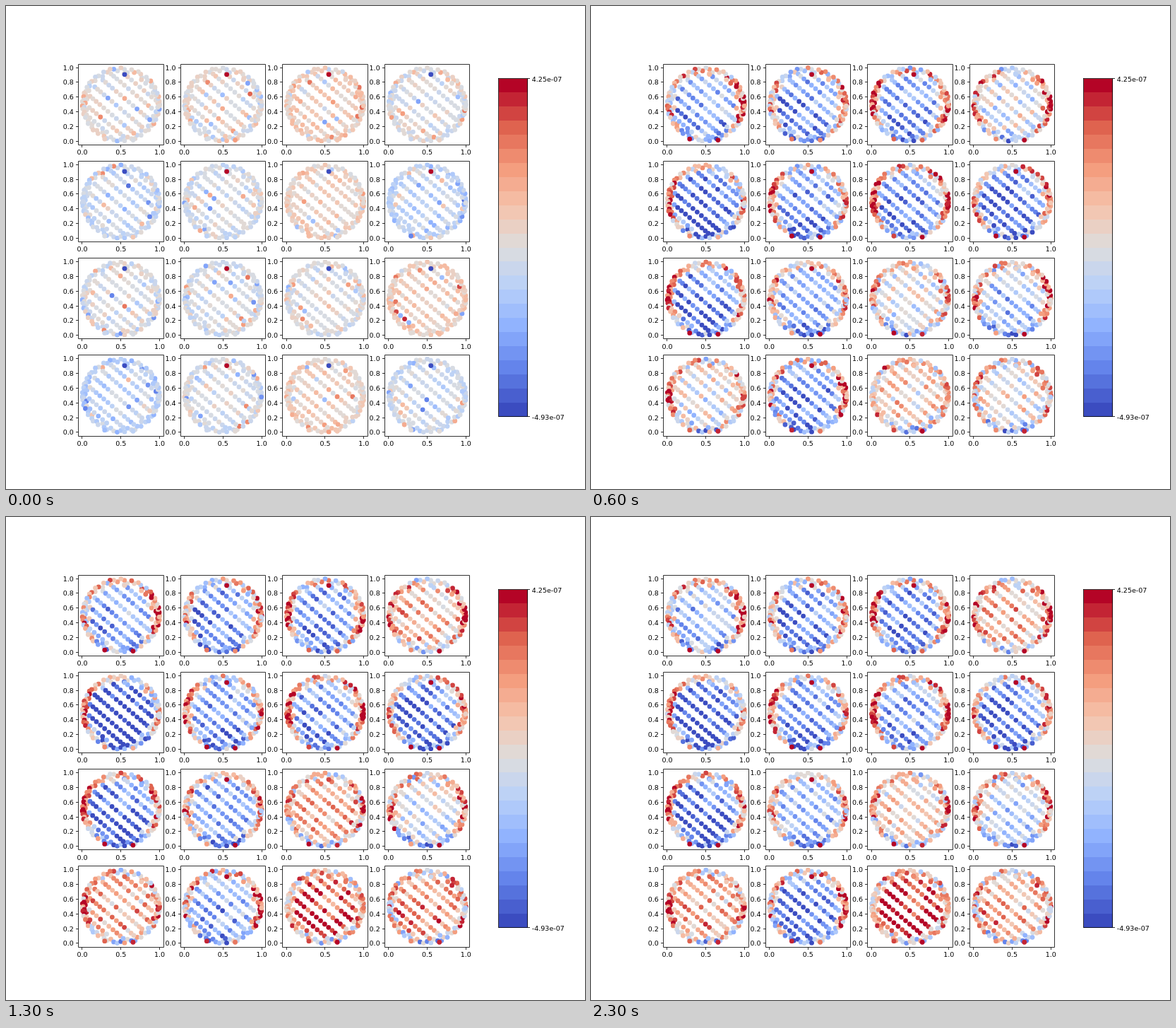
An HTML page for the animation above (2400 ms loop, 820x683 px).

```html
<!DOCTYPE html>
<html lang="en">
<head>
<meta charset="utf-8">
<title>Scatter grid</title>
<style>
  html, body { margin: 0; width: 100%; height: 100%; overflow: hidden; background: #fff; }
  svg { display: block; width: 820px; height: 683px; }
  text { font: 9.5px "DejaVu Sans", sans-serif; }
  .line { fill: none; stroke: #000; stroke-width: .8; }
</style>
</head>
<body>
<svg id="stage" viewBox="0 0 820 683"></svg>
<script>
const stage = document.getElementById('stage');
const FRAME = 100, FRAMES = 24;
const W = 120.5, H = 114.35, SX = W / 1.1, SY = H / 1.1;
const { sin, cos, floor, hypot, PI } = Math;

function add(tag, attrs, text) {
  const el = document.createElementNS('http://www.w3.org/2000/svg', tag);
  for (const key in attrs) el.setAttribute(key, attrs[key]);
  if (text) el.textContent = text;
  return stage.appendChild(el);
}
const snap = v => floor(v) + .5;
const mix = (a, b, t) => a + (b - a) * t;
const clamp = (v, lo = 0, hi = 1) => Math.min(hi, Math.max(lo, v));
const noise = (a, b, c) => {
  const s = sin(a * 12.9898 + b * 78.233 + c * 37.719) * 43758.5453;
  return 2 * (s - floor(s)) - 1;
};

// Diverging blue-grey-red map in equal flat bands
const BANDS = 24;
const ANCHORS = ['3b4cc0', '6282ea', '8db0fe', 'b8d0f9', 'dddddd',
  'f5c4ad', 'f49a7b', 'de604d', 'b40426']
  .map(hex => [0, 2, 4].map(i => parseInt(hex.slice(i, i + 2), 16)));
const bands = Array.from({ length: BANDS }, (_, n) => {
  const s = n / (BANDS - 1) * 8, i = Math.min(7, floor(s));
  return `rgb(${ANCHORS[i].map((c, k) => Math.round(mix(c, ANCHORS[i + 1][k], s - i)))})`;
});
const colorOf = v => bands[Math.min(BANDS - 1, floor(clamp((v + 1) / 2) * BANDS))];

// Dense ring of dots, crowded at the left and right
const dots = [];
for (let k = 0; k < 92; k++) {
  const a = 2 * PI * k / 92, turn = a - .2 * sin(2 * a);
  const depth = .48 * (k * .618034 % 1);
  const r = .5 * Math.sqrt(1 - depth * depth);
  dots.push({ x: .5 + r * cos(turn), y: .5 + r * sin(turn) });
}
// Latitude rows of a tilted sphere, seen from the front
const TILT = -.727;
for (let row = -5; row < 5; row++) {
  const lat = .186 + .28 * row, step = .147 / cos(lat);
  for (let i = -12; i < 12; i++) {
    const lon = (i + .75 + .3 * row) * step;
    const along = .5 * cos(lat) * sin(lon), across = .5 * sin(lat);
    if (Math.abs(lon) < PI / 2 && hypot(along, across) < .435)
      dots.push({
        x: .5 + along * cos(TILT) - across * sin(TILT),
        y: .5 + along * sin(TILT) + across * cos(TILT)
      });
  }
}
dots.push({ x: .548, y: .907, head: true }, { x: .29, y: .03, foot: true }, { x: .657, y: .015, foot: true });
for (const d of dots) {
  const dx = d.x - .5, dy = d.y - .5, r = hypot(dx, dy);
  d.diag = clamp((d.x + d.y - .55) / .9);
  d.rim = clamp((r - .37) / .09);
  d.side = (dx / r) ** 2;
}

// Final tone inside each panel, and the panels whose top dot is red
const TONE = [
  -.4, -.7, -.5, .3,
  -1.1, -.6, -.6, -.9,
  -.9, -.4, .3, -.2,
  .3, -.6, .8, .4
];
const HOT = [1, 2, 5, 7, 9, 13];

function value(p, d, i, frame) {
  const grow = Math.min(1, frame / 4), late = clamp((frame - 4) / 7);
  const tone = mix(-.35 + .45 * TONE[p], TONE[p], late);
  const inside = tone * mix(1.3, .7, d.diag) + .15 * noise(p, frame, 5) * late;
  const rim = mix(d.y > .5 ? .1 : -.4 + .4 * tone, .5 + .3 * noise(p, d.x > .5, 2), d.side);
  const field = mix(inside, rim, d.rim)
    + noise(i, p, 1) * mix(.35, .65, d.rim)
    + noise(i, p, frame + 7) * .15;
  const first = .2 * noise(p, 4, 9) + .16 * noise(i, p, 3) + .6 * noise(i, p, 6) ** 9;
  if (d.head) return HOT.includes(p) ? 1 : mix(-1, field, grow);
  return mix(first, d.foot ? .9 + .5 * noise(i, p, 8) : field, grow);
}

const panels = [];
for (let p = 0; p < 16; p++) {
  const x = 102.5 + p % 4 * W * 1.2, y = 82 + floor(p / 4) * H * 1.2;
  const px = v => x + W / 22 + v * SX, py = v => y + H - H / 22 - v * SY;
  panels.push(dots.map(d => add('circle', { cx: px(d.x), cy: py(d.y), r: 3.4 })));
  const l = snap(x), t = snap(y), r = snap(x + W), b = snap(y + H);
  let path = `M${l} ${t}H${r}V${b}H${l}Z`;
  for (const v of [0, .5, 1]) {
    path += `M${snap(px(v))} ${b}v3.5`;
    add('text', { x: px(v), y: y + H + 13.9, 'text-anchor': 'middle' }, v.toFixed(1));
  }
  for (let n = 0; n < 6; n++) {
    const v = n / 5;
    path += `M${l} ${snap(py(v))}h-3.5`;
    add('text', { x: x - 6.6, y: py(v) + 3.5, 'text-anchor': 'end' }, v.toFixed(1));
  }
  add('path', { d: path, class: 'line' });
}

const bar = { x: 697.5, top: 102.5, bottom: 580.5, w: 41 };
const bandH = (bar.bottom - bar.top) / BANDS;
bands.forEach((fill, n) => add('rect', {
  x: bar.x, y: bar.bottom - (n + 1) * bandH, width: bar.w, height: bandH,
  fill, 'shape-rendering': 'crispEdges'
}));
add('rect', { x: bar.x, y: bar.top, width: bar.w, height: bar.bottom - bar.top, class: 'line' });
for (const [y, label] of [[bar.top, '4.25e-07'], [bar.bottom, '-4.93e-07']]) {
  add('path', { d: `M${bar.x + bar.w} ${y}h3.5`, class: 'line' });
  add('text', { x: 744.8, y: y + 4 }, label);
}

let shown = -1;
const start = performance.now();
function draw() {
  const frame = floor((performance.now() - start) / FRAME) % FRAMES;
  if (frame !== shown) {
    shown = frame;
    panels.forEach((circles, p) => circles.forEach((c, i) =>
      c.setAttribute('fill', colorOf(value(p, dots[i], i, frame)))));
  }
  requestAnimationFrame(draw);
}
draw();
</script>
</body>
</html>
```
